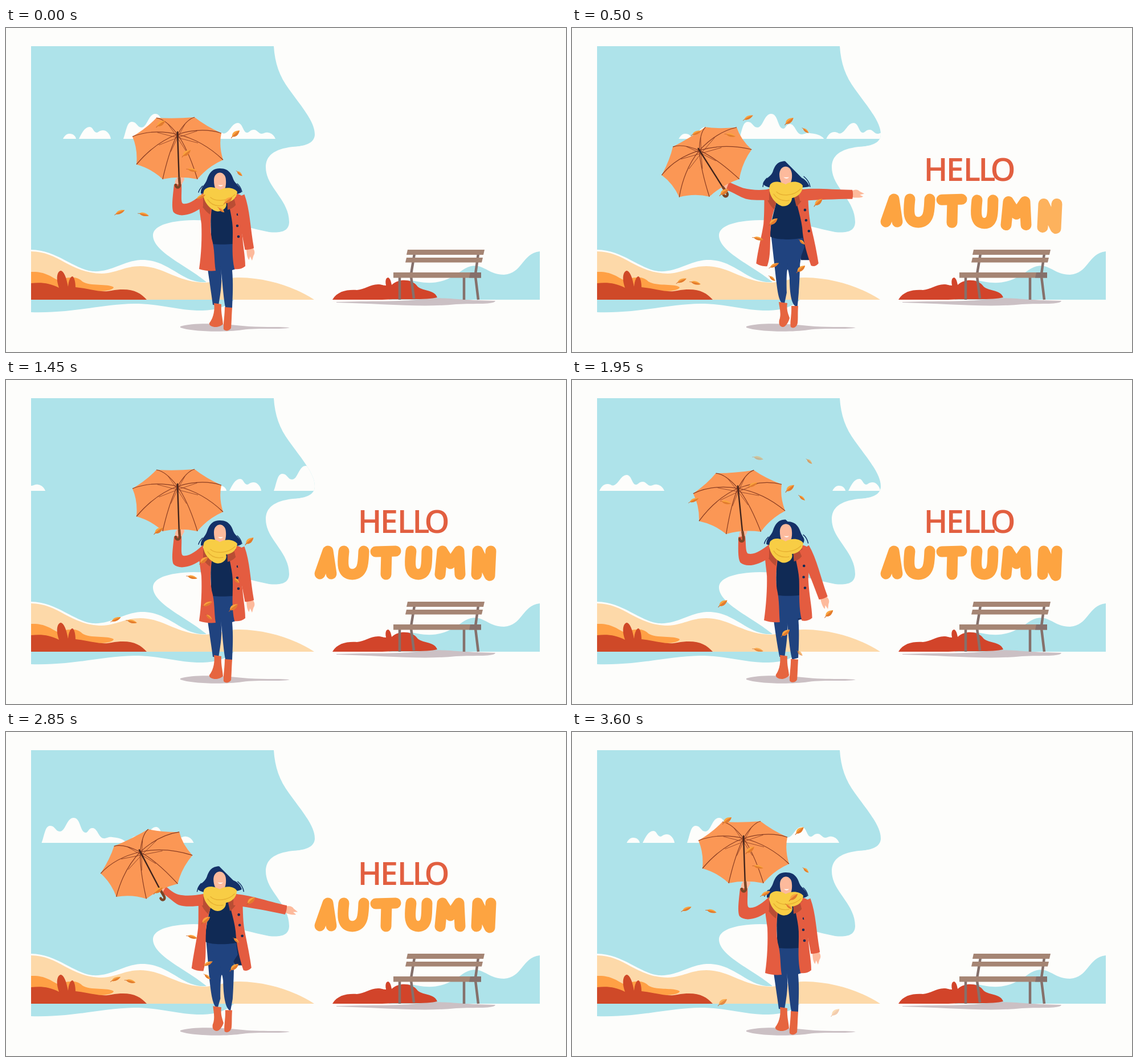
Write an HTML page that moves like this. It is 983 px wide and 570 px high and loops after 3650 ms.

```html
<!DOCTYPE html>
<html lang="en">
<head>
<meta charset="utf-8">
<title>Hello Autumn</title>
<style>
html, body { margin: 0; width: 100%; height: 100%; overflow: hidden; background: #fdfdfb; }
svg { display: block; width: 983px; height: 570px; }
#hello { font: 600 56px "Open Sans", "Noto Sans", sans-serif; fill: #e25f40; text-anchor: middle; }
#autumn { fill: none; stroke: #fda441; stroke-width: 19; stroke-linecap: round; stroke-linejoin: round; }
</style>
</head>
<body>
<svg viewBox="0 0 983 570">
  <defs>
    <path id="skyShape" d="M44 32H470C472 62 480 85 497 108C520 140 542 165 542 187C542 203 524 208 503 209C470 213 456 225 456 245C456 280 497 302 497 341C497 358 482 361 462 359C425 352 390 338 330 338C280 339 257 350 258 366C260 395 318 418 352 447C335 449 318 441 303 432C280 418 262 407 236 408C205 410 185 430 152 428C118 424 90 391 44 390Z"/>
    <clipPath id="skyClip"><use href="#skyShape"/></clipPath>
    <g id="cloud" fill="#fdfdfb">
      <path d="M100 195C104 187 108 186 112 186C118 186 122 190 123 195Z"/>
      <path d="M128 195C133 185 138 174 147 174C153 174 153 183 159 184C162 184 164 180 170 180C178 180 183 188 184 195Z"/>
      <path d="M206 195C211 182 212 165 221 165C230 165 230 175 238 175C248 175 250 151 262 151C275 151 273 176 283 177C288 178 288 168 296 169C304 170 306 185 314 187C320 188 322 184 330 185C340 186 350 188 355 195Z"/>
      <path d="M359 195C362 188 366 183 373 183C380 183 380 187 385 185C393 182 397 167 407 167C415 167 416 182 422 184C427 185 428 179 435 179C441 179 443 186 449 186C453 186 455 183 460 184C467 185 471 190 473 195Z"/>
    </g>
    <g id="leaf">
      <path d="M-8 0C-4 -6 3 -5 9 0C3 5 -4 5 -8 0Z" fill="#faa43f"/>
      <path d="M-8 0C-2 -1 3 -1 9 0C3 5 -4 5 -8 0Z" fill="#e27b2e"/>
      <path d="M-11 1L-7 0" stroke="#c8642a"/>
    </g>
  </defs>

  <use href="#skyShape" fill="#aee3ea"/>
  <g clip-path="url(#skyClip)"><use id="c0" href="#cloud"/><use id="c1" href="#cloud"/></g>

  <path d="M44 478H400C385 493 360 498 335 497C295 495 270 485 225 485C165 486 120 502 44 500Z" fill="#aee3ea"/>
  <path d="M44 393C92 393 112 431 168 432C195 431 208 419 236 419C278 420 300 447 348 448C372 447 385 439 410 439C460 440 505 455 541 478H44Z" fill="#fdd9a9"/>
  <path d="M44 429C68 428 78 437 90 443C105 440 122 434 134 446C148 455 178 449 189 456C188 463 165 463 140 465L44 470Z" fill="#ffa045"/>
  <path d="M44 449C60 447 76 448 93 457C87 440 90 428 96 427C103 428 107 444 109 455C110 444 113 437 117 437C121 440 122 450 122 456C150 459 165 466 185 462C218 456 235 464 247 478H44Z" fill="#cf4928"/>

  <path d="M672 478C676 443 700 441 722 446C768 455 788 434 806 423C836 408 842 434 874 434C907 432 905 397 937 393V478Z" fill="#aee3ea"/>
  <path d="M580 482C640 480 690 482 730 477C765 472 790 479 859 480C857 487 825 484 790 486C730 492 660 485 580 483Z" fill="#cbc0c4"/>
  <path d="M573 478C582 463 598 460 616 461C630 460 640 450 655 451C661 452 664 453 667 453C665 442 668 439 671 439C675 441 676 447 677 452C690 440 712 442 721 453C729 464 752 459 757 474C740 479 690 476 660 478Z" fill="#d2442a"/>
  <path d="M717 397L711 433M829 397L824 433M691 437L691 478M711 437L716 476M804 437L804 478M824 437L829 478" fill="none" stroke="#85706b" stroke-width="4.5"/>
  <path d="M705 390H840L838 399H703ZM703 404H837L835 412.500H701ZM680 430H834V439.500H680Z" fill="#a58574"/>
  <path d="M815 430H834V439.500H813Z" fill="#85706b"/>

  <g id="hello"></g>
  <g id="autumn"></g>
  <path d="M306 525C330 518 375 520 415 524C445 527 475 525 498 527C485 531 445 527 415 531C380 536 325 534 306 527Z" fill="#cbc0c4"/>
  <g id="woman"></g>
  <g id="leaves"></g>
</svg>
<script>
const LOOP = 3650, STEP = 50;
const $ = id => document.getElementById(id);
const clamp = v => Math.max(0, Math.min(1, v));
const mix = (a, b, k) => a + (b - a) * k;
const ease = p => (1 - Math.cos(Math.PI * clamp(p))) / 2;

function add(parent, tag, attrs) {
  const el = document.createElementNS("http://www.w3.org/2000/svg", tag);
  for (const k in attrs) el.setAttribute(k, attrs[k]);
  return parent.appendChild(el);
}

// Body parts that bend between the standing and the jumping pose
const woman = $("woman"), parts = [];
function part(fill, a, b, extra) {
  const to = b.match(/-?[\d.]+/g).map(Number);
  const el = add(woman, "path", { fill, ...extra });
  parts.push(k => {
    let i = 0;
    el.setAttribute("d", a.replace(/-?[\d.]+/g, n => mix(+n, to[i++], k).toFixed(2)));
  });
}
const SKIN = "#fdba9c", COAT = "#e45c40", HOOD = "#b94d34", NAVY = "#102a55", JEANS = "#20437f", BOOT = "#e6653f";
const line = (stroke, w) => ({ stroke, "stroke-width": w, "stroke-linecap": "round" });

// Hair
part("#143168",
  "M375 247C361 247 356 257 353 266C350 276 341 280 342 291C352 296 405 296 413 289C413 278 403 276 399 266C395 254 389 247 375 247Z",
  "M374 234C360 234 356 243 353 251C350 262 338 264 335 273C338 280 348 281 352 281L398 281C410 281 417 279 416 275C411 267 404 264 399 254C395 241 389 234 374 234Z");
part("none", "M345 278C341 282 339 285 338 289M406 274C412 279 413 284 414 288",
  "M342 264C338 268 336 272 335 279M407 261C413 266 417 272 418 279", line("#143168", 1.5));
// Legs and boots
part(JEANS,
  "M362 378L401 378L403 424L397 426C399 450 398 470 397 492L385 492C381 470 380 445 377 424C380 445 377 465 373 488L363 487C360 465 357 445 354 424Z",
  "M349 362L404 362C409 385 401 400 400 412C400 440 398 465 396 490L386 491C382 470 382 440 377 403C376 440 377 465 373 486L363 485C361 465 358 440 354 414Z");
part(BOOT, "M365 484L378 486C377 500 380 510 381 521C378 524 372 526 368 526C361 526 356 523 357 519C364 510 367 497 365 484Z",
  "M363 482L378 484C376 497 380 504 382 510C380 518 375 526 370 526C364 525 363 520 364 514C368 503 364 492 363 482Z");
part(BOOT, "M384 491L397 492C396 506 396 516 395 528C392 533 385 534 382 530C381 522 384 506 384 491Z",
  "M385 489L397 489C396 502 397 510 396 519C394 527 388 529 384 526C382 518 386 505 385 489Z");
// Coat lining, hips, jumper
part("#162b57", "M362 340L402 340L404 423L396 423L390 380Z", "M362 340L410 340L424 408L402 408L396 380Z");
part(JEANS, "M362 378L400 378L401 424L378 424L376 418L373 424L364 424Z",
  "M349 364L404 364C408 385 403 400 400 418L379 418L377 404L375 418L347 410Z");
part(NAVY, "M362 300L396 300C401 330 400 355 398 380C387 381 372 381 361 380C359 355 358 325 362 300Z",
  "M362 290L394 290C406 325 406 345 405 369C390 372 362 374 348 367C346 345 358 315 362 290Z");
// Coat
part(COAT, "M339 302C345 293 355 293 363 296C362 318 356 342 361 370C367 390 365 408 368 427C358 428 348 427 339 424C343 397 344 368 343 345C341 328 338 315 339 302Z",
  "M338 286C345 281 355 282 362 285C362 305 352 320 349 345C346 370 350 400 342 419C335 419 329 418 323 414C326 390 333 365 336 345C338 325 337 305 338 286Z");
part(COAT, "M390 294C405 287 418 294 421 307C421 325 414 335 414 352C415 380 420 400 420 419C414 424 407 425 401 424C396 402 398 380 398 360C399 335 390 315 390 294Z",
  "M390 286C400 281 410 282 414 294C415 315 416 335 421 355C426 375 430 395 433 414C429 419 425 420 420 418C413 398 407 378 405 360C404 335 393 310 390 286Z");
part(HOOD, "M340 304C345 293 365 297 362 306C360 312 360 320 358 328C350 322 343 314 340 304ZM388 300C396 296 405 294 408 304C404 313 397 318 389 320Z",
  "M340 294C345 283 365 287 362 296C360 302 357 312 355 319C348 313 343 304 340 294ZM388 290C396 286 405 284 408 294C404 303 400 309 394 314Z");
part("none", "M407 328L407 328M406 348L406 348M408 367L408 367",
  "M409 320L409 320M411 338L411 338M416 357L416 357", line(NAVY, 4.6));

// Right arm swings from the shoulder
const arm = add(woman, "g", {});
add(arm, "path", { fill: SKIN, d: "M85 -5C92 -9 97 -9 101 -5L109 -1L101 1L107 4C102 7 94 6 85 5Z" });
add(arm, "path", { fill: COAT, d: "M-8 -8C20 -13 50 -8 88 -8Q90 0 88 8C55 8 30 9 -4 11Z" });

// Face and scarf
part(SKIN, "M365 268C365 250 386 250 386 268C387 280 383 290 376 290C369 290 365 280 365 268Z",
  "M364 257C365 239 385 239 386 257C387 268 383 278 376 278C369 278 364 268 364 257Z");
part("#fff", "M372 276Q376 277 381 276Q377 281 372 276Z", "M371 262Q376 263 381 262Q377 267 371 262Z");
part("#f8cd45", "M348 285C355 277 368 280 375 285C385 279 400 280 406 288C405 300 396 306 386 307C390 317 377 325 368 322C354 317 342 298 348 285Z",
  "M348 275C355 267 368 271 375 275C385 268 400 269 405 277C405 290 396 297 386 299C386 308 377 315 368 313C354 308 342 288 348 275Z");
part("none", "M359 298C368 306 390 305 402 293M354 302C360 311 370 314 381 312",
  "M359 288C368 297 390 295 401 283M354 292C360 301 370 305 381 303", line("#e7b132", 1.5));

// Left arm and hand
part(SKIN, "M297 278C295 268 300 261 305 260C310 260 314 263 313 267C311 271 308 274 308 279Z",
  "M274 287C266 288 260 285 262 280C263 275 266 270 270 270C274 270 276 272 277 274Z");
part(COAT, "M346 290C335 300 322 311 311 309C306 308 309 290 308 275L295 275C293 295 290 315 294 324C305 335 328 328 346 314Z",
  "M346 284C330 285 315 285 300 281C290 277 282 274 275 271L270 285C285 290 295 297 305 300C318 303 332 302 346 303Z");

// Umbrella, drawn around its hub
const umbrella = add(woman, "g", {});
const rim = [[-79, 4], [-37, -29], [30, -30], [77, -2], [80, 45], [35, 79], [-26, 79], [-72, 53]];
const edge = rim.map(([x, y], i) => {
  const [u, v] = rim[(i + 1) % 8];
  return `Q${(x + u) / 2 * .92} ${(y + v) / 2 * .92} ${u} ${v}`;
}).join("");
add(umbrella, "path", { fill: "#fb9755", d: `M${rim[0]}${edge}Z` });
const ribs = rim.map(([x, y]) => `M0 0Q${x * .55} ${y * .5 - 12} ${x} ${y}`).join("");
const struts = rim.map(([x, y]) => `M0 6L${x * .45} ${y * .45 - 5}`).join("");
add(umbrella, "path", { fill: "none", stroke: "#8a3d22", "stroke-width": 1.2, d: ribs });
add(umbrella, "path", { fill: "none", stroke: "#8a3d22", "stroke-width": .8, d: struts });
add(umbrella, "path", { fill: "none", ...line("#40241c", 2.4), d: "M0 -4L3 84" });
add(umbrella, "path", { fill: "none", ...line("#7a4526", 4.5), d: "M3 77L4 89C4 95 -3 95 -3 89" });

// Lettering
const hello = [638.5, 672.5, 702, 728.5, 756.5].map((x, i) => {
  const el = add($("hello"), "text", { x, y: 269 });
  el.textContent = "HELLO"[i];
  return el;
});
const autumn = [
  "M551 341L565 301L571 341M557 328L568 328",
  "M593 301C591 320 588 341 608 342C628 341 627 320 628 301",
  "M649 302L684 301M668 303L667 342",
  "M711 301C709 320 706 341 724 342C741 341 738 320 739 301",
  "M762 342L766 301L780 323L795 301L797 342",
  "M826 342L828 301L849 344L851 301"
].map(d => add($("autumn"), "path", { d }));
function reveal(el, p, out) {
  p = clamp(p);
  el.setAttribute("transform", `translate(0 ${60 * (1 - p) ** 2})`);
  el.setAttribute("opacity", Math.min(1, p * 1.35) * out);
}

// Leaves: x, y, drift, drift bend, angle, length, thickness
const leafKinds = [
  [272, 168, -.6, .012, -35, 1, 1], [403, 186, 3.3, -.035, -40, 1, 1],
  [317, 220, 4.2, -.055, -38, 1, 1], [327, 250, 0, 0, 14, 1, .75],
  [410, 256, -.7, .008, 42, .7, .6], [342, 297, 2.1, -.08, -26, 1, .75],
  [390, 303, 1, .02, -38, 1, 1], [378, 320, -2.8, .015, 40, .75, .6],
  [200, 324, -1.2, .045, -24, 1, .75], [242, 328, -2.9, .04, 14, 1, .75]
];
const leaves = [0, 20.9, 47.8, 73].flatMap(start => leafKinds.map(kind =>
  ({ start, kind, el: add($("leaves"), "use", { href: "#leaf" }) })));
function fall({ start, kind: [x, y, v, q, angle, sx, sy], el }, f) {
  const p = f - start;
  const py = y + (p < 0 ? 12.8 * p : 11.6 * p + .045 * p * p), px = x + v * p + q * p * p;
  const o = clamp((py - 126) / 26) * clamp((508 - py) / 40);
  el.setAttribute("opacity", o);
  if (o) el.setAttribute("transform", `translate(${px} ${py}) rotate(${angle}) scale(${sx} ${sy})`);
}

function draw(now) {
  const f = Math.floor((now % LOOP) / STEP);
  const k = ease(f / 11) - ease((f - 18) / 11) + ease((f - 36.5) / 11) - ease((f - 54) / 11);
  parts.forEach(set => set(k));
  arm.setAttribute("transform", `translate(${mix(412, 404, k)} ${mix(302, 293, k)}) rotate(${mix(80, -2, k)})`);
  umbrella.setAttribute("transform", `translate(${mix(301, 222, k)} ${mix(187, 216, k)}) rotate(${-31 * k})`);

  const drift = 9.3 * Math.max(0, f - .6);
  $("c0").setAttribute("x", drift);
  $("c1").setAttribute("x", drift - 668);

  const out = clamp((71 - f) / 9);
  hello.forEach((el, i) => reveal(el, (f - i * .5) / 7, out));
  autumn.forEach((el, i) => reveal(el, (f - 1 - i * .8) / 8, out));
  leaves.forEach(l => fall(l, f));
}
function tick() {
  draw(performance.now());
  requestAnimationFrame(tick);
}
tick();
</script>
</body>
</html>
```
